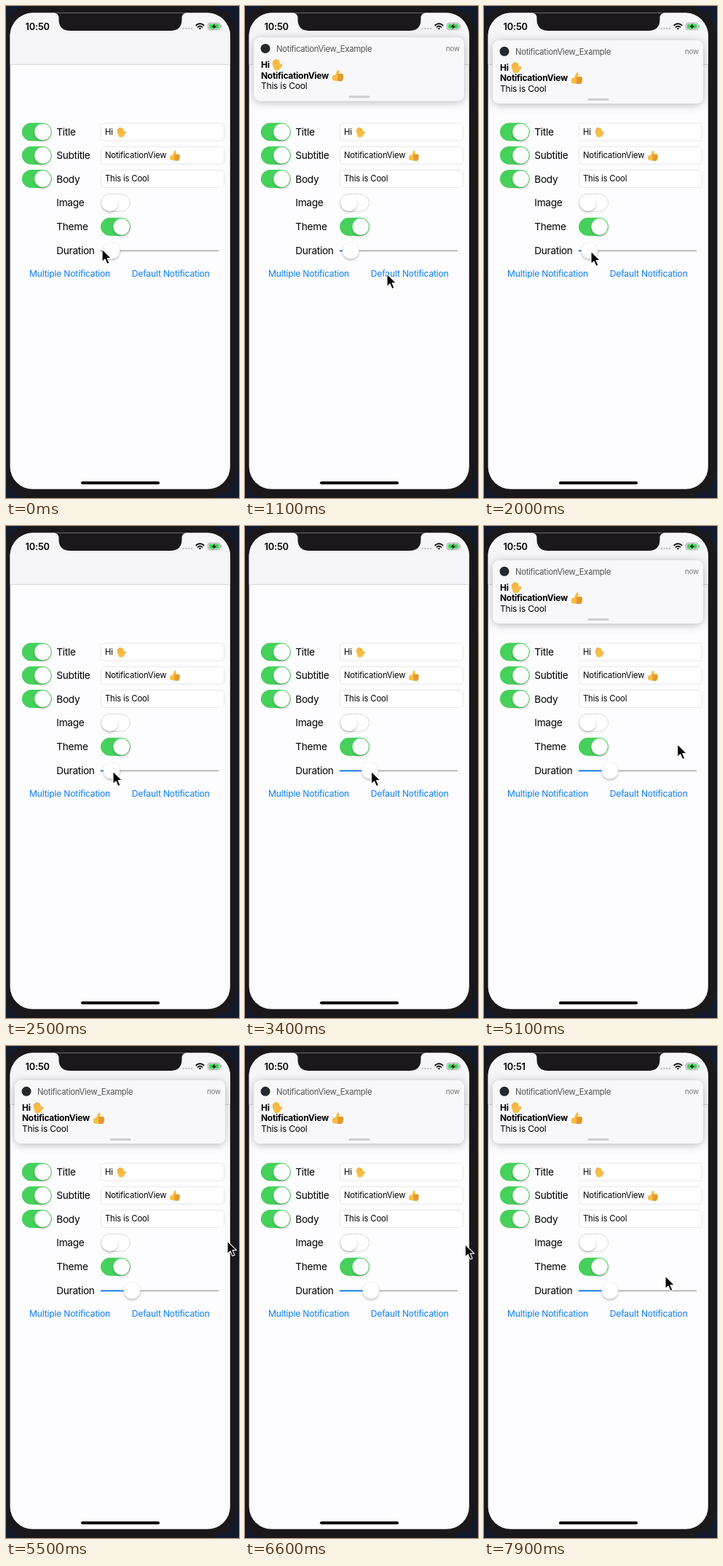
An HTML page for the animation above (8000 ms loop, 320 by 676 pixels).

```html
<!DOCTYPE html>
<html lang="en">
<head>
<meta charset="utf-8">
<title>Notification demo</title>
<style>
  html, body { margin: 0; width: 100%; height: 100%; overflow: hidden; background: #121a2b; }
  svg { display: block; width: 320px; height: 676px; font-family: Inter, Roboto, sans-serif; }
  .label { font-size: 13.7px; letter-spacing: -.33px; }
  .field { font-size: 11.3px; letter-spacing: -.17px; }
  .button { font-size: 12.1px; letter-spacing: -.17px; fill: #087cf8; }
  .clock { font-size: 12.8px; font-weight: 600; letter-spacing: -.2px; }
  .app { font-size: 11.3px; letter-spacing: -.28px; fill: #555457; }
  .now { font-size: 9.7px; letter-spacing: -.15px; fill: #747376; }
  .bold { font-size: 12px; font-weight: 700; letter-spacing: -.3px; }
  .body { font-size: 12px; letter-spacing: -.22px; }
</style>
</head>
<body>
<svg viewBox="0 0 320 676">
  <defs>
    <clipPath id="screen"><rect x="5.6" y="9.6" width="302.2" height="654.2" rx="31"/></clipPath>
    <filter id="soft" x="-30%" y="-30%" width="160%" height="170%">
      <feDropShadow dx="0" dy="2" stdDeviation="1.7" flood-opacity=".24"/>
    </filter>
    <filter id="lift" x="-15%" y="-40%" width="130%" height="180%">
      <feDropShadow dx="0" dy="2" stdDeviation="6" flood-opacity=".27"/>
    </filter>
    <g id="hand" transform="rotate(-12 8 8)" stroke-linecap="round" fill="none">
      <g stroke="#e09a2c" stroke-width="2.5">
        <path id="fingers" d="M4.4 9V4.2M6.6 9V2.4M8.8 9V2.2M10.9 9V4M10.4 12.4L14 9.4"/>
      </g>
      <rect x="3.3" y="7" width="8.7" height="8.2" rx="3.6" fill="#fbbc42"/>
      <use href="#fingers" stroke="#fbbc42" stroke-width="1.9"/>
    </g>
    <g id="thumb" stroke-linecap="round" fill="none">
      <path d="M1 8.5L4.6 7.5 7.6 1.1Q10.3 .3 10.1 3.4L9.5 6.4H12V15.2H5L1 14.2Z" fill="#fbbc42"/>
      <path id="knuckles" d="M9 7.5H13.5M9 9.8H14M9 12.1H13.6M9 14.2H12.6" stroke="#e09a2c" stroke-width="2.6"/>
      <use href="#knuckles" stroke="#fbbc42" stroke-width="1.8"/>
    </g>
  </defs>

  <rect x="-8" width="326" height="676" rx="42" fill="#1a181b"/>
  <g clip-path="url(#screen)">
    <rect x="5" y="9" width="304" height="656" fill="#fdfcfe"/>
    <rect x="5" y="9" width="304" height="71" fill="#f6f5f7"/>
    <path d="M5 80.3H309" stroke="#c9c8cb" stroke-width=".8"/>

    <text id="clock" class="clock" x="26.6" y="32.5">10:50</text>
    <g fill="#c3c2c5">
      <circle cx="243.6" cy="31" r="1.3"/><circle cx="247.4" cy="31" r="1.3"/>
      <circle cx="251.2" cy="31" r="1.3"/><circle cx="255" cy="31" r="1.3"/>
    </g>
    <g fill="none" stroke="#111" stroke-width="1.9">
      <path d="M260.6 27Q266.4 21.6 272.2 27M262.8 29.4Q266.4 26.2 270 29.4"/>
      <path d="M266.4 32.6L264.6 30.8Q266.4 29.4 268.2 30.8Z" fill="#111" stroke="none"/>
    </g>
    <rect x="277.4" y="23.4" width="16.6" height="9.2" rx="2.6" fill="none" stroke="#9b9a9d" stroke-width=".9"/>
    <rect x="278.8" y="24.8" width="13.8" height="6.4" rx="1.4" fill="#45d15b"/>
    <path d="M295.2 26.6V29.6" stroke="#9b9a9d" stroke-width="1.3"/>
    <path d="M287 23.8L282.6 28.7H285.4L284.4 32.4 288.9 27.4H286Z" fill="#111"/>

    <g id="form"></g>

    <path d="M130 336.3H292" stroke="#b0afb2" stroke-width="1.8"/>
    <path id="filled" stroke="#087cf8" stroke-width="1.8"/>
    <circle id="knob" cy="336" r="11.3" fill="#fff" stroke="#000" stroke-opacity=".07" stroke-width=".6" filter="url(#soft)"/>
    <text class="button" x="32" y="372.4">Multiple Notification</text>
    <text class="button" x="172.8" y="372.4">Default Notification</text>
    <rect x="103" y="653.2" width="108" height="4" rx="2" fill="#050505"/>

    <g id="banner">
      <rect x="12" y="47" width="289" height="87" rx="9.5" fill="#f8f7f9" filter="url(#lift)"/>
      <circle cx="28" cy="62.3" r="6.5" fill="#24292e"/>
      <text class="app" x="43" y="66.8">NotificationView_Example</text>
      <text class="now" x="276" y="66">now</text>
      <text class="bold" x="22" y="89">Hi</text>
      <use href="#hand" transform="translate(35 76) scale(1.06)"/>
      <text class="bold" x="22" y="103.4">NotificationView</text>
      <use href="#thumb" transform="translate(119 90.6) scale(1.06)"/>
      <text class="body" x="22" y="118">This is Cool</text>
      <rect x="142.5" y="127" width="29" height="3" rx="1.5" fill="#cecdcf"/>
    </g>
  </g>
  <path d="M66 9.5Q72.5 10 72.5 16.5V19Q73 34 88 34H226Q241 34 241.5 19V16.5Q241.5 10 248 9.5Z" fill="#1a181b"/>
  <path id="cursor" d="M0 0V17.4L4 13.8 7 20.6 10 19.3 7.1 12.6H12.5Z" fill="#050505" stroke="#fff" stroke-width="1.1" stroke-linejoin="round"/>
</svg>
<script>
const LOOP = 8000;
const $ = id => document.getElementById(id);

const toggle = (x, y, on) => `
  <rect x="${x + .5}" y="${y - 12}" width="40" height="24" rx="12"
    fill="${on ? '#45d15b' : '#fefdff'}" stroke="${on ? '#45d15b' : '#dcdbde'}"/>
  <circle cx="${x + (on ? 28.7 : 12.6)}" cy="${y}" r="11.2" fill="#fff" filter="url(#soft)"/>`;
const label = (text, y) => `<text class="label" x="69.3" y="${y + 5}">${text}</text>`;
const field = (text, y, icon) => `
  <rect x="130.5" y="${y - 12}" width="169" height="24" rx="4" fill="#fff" stroke="#e5e4e7" stroke-width=".9"/>
  <text class="field" x="136" y="${y + 3.8}">${text}</text>${icon}`;
const emoji = (id, x, y) => `<use href="#${id}" transform="translate(${x} ${y}) scale(.95)"/>`;

const rows = [
  ['Title', 173, 'Hi', emoji('hand', 150.3, 165.8)],
  ['Subtitle', 205.3, 'NotificationView', emoji('thumb', 224.3, 197.8)],
  ['Body', 237.5, 'This is Cool', '']
];
$('form').innerHTML =
  rows.map(([name, y, text, icon]) => toggle(21.8, y, true) + label(name, y) + field(text, y, icon)).join('') +
  label('Image', 270.3) + toggle(130, 270.3, false) +
  label('Theme', 303.3) + toggle(130, 303.3, true) +
  label('Duration', 336);

const clamp = v => Math.min(1, Math.max(0, v));
const smooth = p => p * p * (3 - 2 * p);
const easeOut = p => 1 - (1 - p) ** 3;

// Keys are [time, value, ...]; values are eased between neighbours.
function track(keys, t) {
  let i = 0;
  while (i < keys.length - 2 && t >= keys[i + 1][0]) i++;
  const [a, b] = [keys[i], keys[i + 1]];
  const p = smooth(clamp((t - a[0]) / (b[0] - a[0])));
  return a.slice(1).map((v, k) => v + (b[k + 1] - v) * p);
}

const cursorKeys = [
  [0, 132, 334], [650, 195, 368], [1250, 195, 368], [1850, 147, 337], [2800, 147, 337],
  [3500, 175, 337], [3700, 175, 337], [4200, 194.5, 359], [4650, 194.5, 359],
  [5400, 304, 268], [6500, 304, 268], [7200, 274, 349], [7800, 249, 316], [LOOP, 249, 316]
];
const knobKeys = [[2800, 145], [3500, 173]];

function bannerShown(t) {
  const first = easeOut(clamp((t - 750) / 500)) - smooth(clamp((t - 2050) / 400));
  return first + easeOut(clamp((t - 4600) / 500));
}

function render(t) {
  const [x, y] = track(cursorKeys, t);
  const [knob] = track(knobKeys, t);
  const shown = bannerShown(t);
  $('cursor').setAttribute('transform', `translate(${x} ${y})`);
  $('knob').setAttribute('cx', knob);
  $('filled').setAttribute('d', `M130 336.3H${knob}`);
  $('banner').setAttribute('transform', `translate(0 ${-145 * (1 - shown)})`);
  $('banner').setAttribute('visibility', shown > .001 ? 'visible' : 'hidden');
  $('clock').textContent = t < 7500 ? '10:50' : '10:51';
}

const start = performance.now();
function tick() {
  render((performance.now() - start) % LOOP);
  requestAnimationFrame(tick);
}
tick();
</script>
</body>
</html>
```
